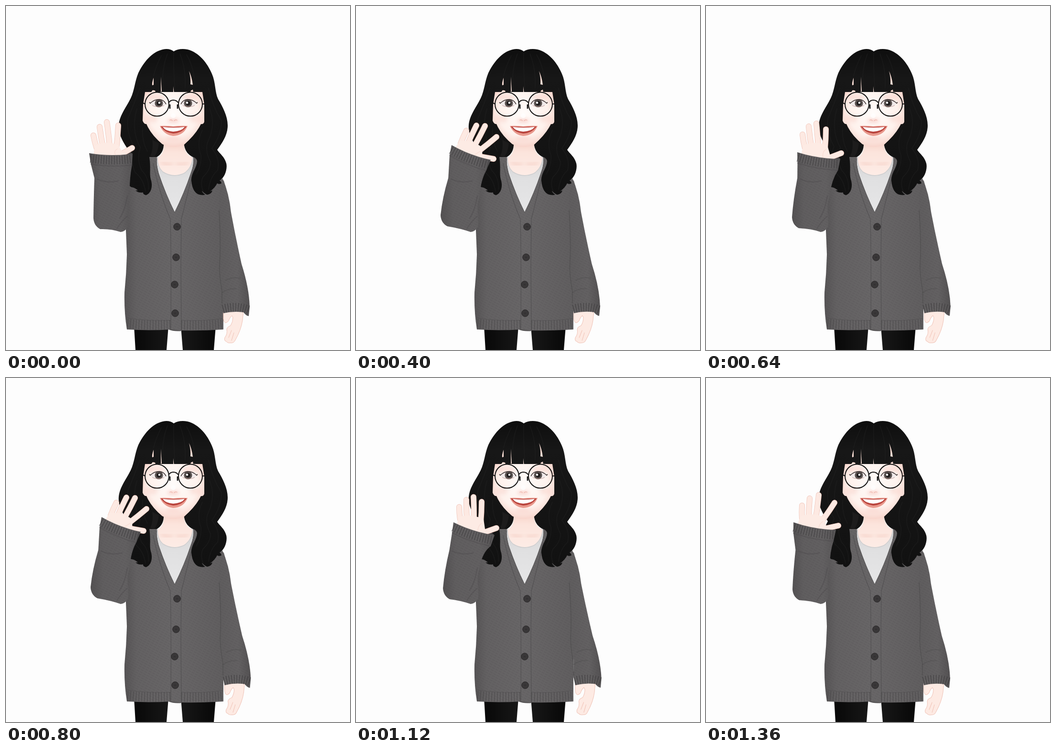
Write an HTML page that moves like this. It is 720 by 720 pixels and loops after 1440 ms.

```html
<!DOCTYPE html>
<html lang="en">
<head>
<meta charset="utf-8">
<title>Waving avatar</title>
<style>
html, body { margin: 0; width: 100%; height: 100%; overflow: hidden; background: #fdfdfd; }
svg { display: block; width: 100vw; height: 100vh; }
.line { fill: none; stroke-linecap: round; stroke-linejoin: round; }
.soft { filter: url(#blur); }
.knit { fill: url(#knit); }
</style>
</head>
<body>
<svg viewBox="0 0 720 720">
  <defs>
    <filter id="blur" x="-50%" y="-50%" width="200%" height="200%"><feGaussianBlur stdDeviation="4"/></filter>
    <pattern id="knit" width="8" height="5" patternUnits="userSpaceOnUse" patternTransform="rotate(28)">
      <path d="M0 1H6" stroke="#3e3c3d" stroke-opacity=".24" stroke-width="1"/>
    </pattern>
    <linearGradient id="wool" gradientUnits="userSpaceOnUse" x1="248" x2="456" y1="0" y2="0">
      <stop offset="0" stop-color="#565455"/><stop offset=".12" stop-color="#636162"/>
      <stop offset=".5" stop-color="#686667"/><stop offset="1" stop-color="#605e5f"/>
    </linearGradient>
    <linearGradient id="sleeve">
      <stop offset="0" stop-color="#5f5d5e"/><stop offset=".6" stop-color="#636162"/><stop offset="1" stop-color="#535152"/>
    </linearGradient>
    <linearGradient id="fore">
      <stop offset="0" stop-color="#535152"/><stop offset=".25" stop-color="#605e5f"/>
      <stop offset=".7" stop-color="#626061"/><stop offset="1" stop-color="#575556"/>
    </linearGradient>
    <linearGradient id="leg">
      <stop offset="0" stop-color="#080808"/><stop offset=".5" stop-color="#1a1a1a"/><stop offset="1" stop-color="#080808"/>
    </linearGradient>
    <radialGradient id="skin" gradientUnits="userSpaceOnUse" cx="350" cy="222" r="78">
      <stop offset="0" stop-color="#fffcfa"/><stop offset=".65" stop-color="#fef2ed"/><stop offset="1" stop-color="#f7cfc5"/>
    </radialGradient>
    <linearGradient id="neck" x2="0" y2="1">
      <stop offset="0" stop-color="#f6cfc4"/><stop offset=".35" stop-color="#fce4dc"/><stop offset="1" stop-color="#fdece6"/>
    </linearGradient>
    <linearGradient id="shirt" x2="0" y2="1">
      <stop offset="0" stop-color="#d2d2d3"/><stop offset=".4" stop-color="#e0e0e1"/><stop offset="1" stop-color="#e6e6e7"/>
    </linearGradient>
    <linearGradient id="hair" gradientUnits="userSpaceOnUse" x1="0" x2="0" y1="90" y2="396">
      <stop offset="0" stop-color="#0e0e0e"/><stop offset=".2" stop-color="#171717"/><stop offset="1" stop-color="#111"/>
    </linearGradient>
  </defs>

  <rect width="720" height="720" fill="#fdfdfd"/>
  <path d="M268 670H340L336 720H271Z M366 670H439L435 720H370Z" fill="url(#leg)"/>

  <!-- cardigan -->
  <path d="M340 670H368V680Q352 682 340 677Z" fill="#555354"/>
  <g id="body"></g>
  <path class="line" d="M254 653Q300 660 345 658M367 658Q415 660 453 654" stroke="#4b494a" stroke-opacity=".5"/>
  <path d="M254 665Q300 669 345 667M367 668Q412 669 453 666" fill="none" stroke="#3f3d3e" stroke-opacity=".5" stroke-width="20" stroke-dasharray="1.3 4.6"/>
  <path class="line" d="M308 330Q322 395 344 446Q346 520 345 677M392 345Q376 410 367 446L366 540L367 679" stroke="#434142" stroke-opacity=".5" stroke-width="1.2"/>
  <g id="buttons" fill="#393738" stroke="#292728"></g>

  <g id="side">
    <path d="M455 641V655Q456 663 460 663Q466 661 467 656Q470 650 473 648L475 652Q475 661 470 669Q462 672 462 677Q464 686 458 694Q456 701 461 702Q464 706 470 705Q477 706 480 699Q492 678 495 658L497 638Z" fill="#fdeae3" stroke="#f0c4b8"/>
    <path class="line" d="M472 679L466 694M477 684L472 700" stroke="#f0c2b6"/>
    <g id="right"></g>
    <path class="line" d="M446 428Q450 500 447 540Q446 562 452 596L452 622" stroke="#434142" stroke-opacity=".4" stroke-width="1.5"/>
    <path class="line" d="M452 600Q466 590 482 592M460 574Q475 566 490 570" stroke="#474546" stroke-opacity=".3" stroke-width="2"/>
    <path d="M454 634Q482 626 508 636" fill="none" stroke="#353334" stroke-opacity=".6" stroke-width="18" stroke-dasharray="1.3 4"/>
  </g>

  <path d="M316 316Q314 328 320 350Q334 392 353 432Q372 392 386 352Q394 330 391 315Z" fill="url(#shirt)"/>
  <path class="line" d="M316 318Q313 330 320 354Q335 396 353 432Q374 390 387 350Q395 328 396 318" stroke="#565455"/>
  <path d="M330 280H373V294Q376 311 391 318Q389 339 373 350Q350 361 328 347Q317 337 317 318Q329 310 330 296Z" fill="url(#neck)"/>
  <path class="line" d="M317 319Q317 337 328 347Q350 361 373 350Q389 339 391 318" stroke="#cfcfd0" stroke-width="1.6"/>
  <path class="line soft" d="M326 328Q340 334 347 331M358 331Q368 334 380 328" stroke="#f0bfb2" stroke-width="3"/>

  <!-- hair -->
  <path fill="url(#hair)" d="M351 95Q342 88 328 91C305 96 288 118 277 140C269 160 269 176 261 193C252 212 238 228 236 248C234 268 245 284 255 300C243 320 242 345 256 366Q254 374 262 379Q270 380 276 386L271 386Q278 392 287 390Q286 394 293 396C304 392 307 378 304 366C299 352 304 342 300 316H316Q329 308 330 292V285H372L373 292Q376 309 391 316Q399 318 400 325C399 340 387 350 388 366Q390 388 402 394Q410 397 417 395Q411 391 410 387Q416 393 421 395Q430 394 432 386L427 388Q438 380 442 371Q446 374 451 371Q450 367 447 365C458 360 464 340 461 329C457 315 448 310 442 301C453 286 464 270 464 250C464 230 453 210 444 195C437 180 439 160 431 142C422 120 404 97 380 91Q362 88 351 95Z"/>
  <g class="line" stroke="#262626" stroke-opacity=".4" stroke-width="1.6">
    <path d="M351 97Q350 120 353 170M338 100Q326 130 328 172M364 100Q377 132 375 172M325 104Q312 130 309 146M378 102Q390 122 394 150"/>
    <path d="M280 172Q268 205 255 236Q252 266 268 294Q258 320 270 348Q288 362 292 388M274 215Q261 260 281 296Q273 322 284 344Q300 360 298 384M286 255Q284 284 296 304"/>
    <path d="M424 172Q432 210 451 240Q451 270 431 298Q449 320 443 344Q428 356 424 384M426 214Q440 248 422 285Q416 304 428 326Q428 344 412 358Q406 372 413 389M411 260Q398 286 408 312Q410 332 398 352"/>
  </g>
  <path d="M302 314Q309 298 306 280L320 287Q318 306 311 315Z" fill="#1d1c1c"/>

  <!-- face -->
  <path d="M291 180L287 206L286 240Q289 248 294 247Q303 269 327 289Q350 301 373 290Q398 268 408 247Q414 248 415 242L415 206L411 180Z" fill="url(#skin)"/>
  <g fill="#f6dcd3">
    <path d="M309 150Q305 161 306 166L309 165ZM324 148L324 179H326ZM350 168L350 180H351.5ZM383 136Q387 150 386 164L391 165Q389 148 383 136Z"/>
    <path d="M304 180L307 176L312 177L313 180ZM386 180L387 177L391 175L392 180Z"/>
  </g>
  <g class="soft" fill="#f4aea4">
    <ellipse cx="316" cy="191" rx="18" ry="6" opacity=".3"/>
    <ellipse cx="384" cy="191" rx="18" ry="6" opacity=".3"/>
    <ellipse cx="305" cy="236" rx="13" ry="8" opacity=".25"/>
    <ellipse cx="397" cy="236" rx="13" ry="8" opacity=".25"/>
    <ellipse cx="350" cy="240" rx="13" ry="3" opacity=".7"/>
    <ellipse cx="350" cy="277" rx="17" ry="2.5" opacity=".5"/>
  </g>
  <ellipse cx="350" cy="230" rx="5" ry="5" fill="#fff" opacity=".65"/>
  <path class="line" d="M343 239Q346 237 348 240M352 240Q355 237 358 239" stroke="#e8a095" stroke-opacity=".6" stroke-width="1.5"/>
  <path d="M322 251Q337 250 350 252Q364 250 380 251Q372 271 350 272Q331 270 322 251Z" fill="#e9998d"/>
  <path d="M324 252Q350 254 378 252Q369 266 350 267Q332 265 324 252Z" fill="#b9443d"/>
  <path d="M328 253Q350 256 374 253Q368 262 350 263Q334 262 328 253Z" fill="#fff"/>

  <g id="eyes"></g>
  <g fill="none" stroke="#121212" stroke-width="2">
    <circle cx="316" cy="205.5" r="25"/><circle cx="386" cy="205.5" r="25"/>
    <path d="M340 203Q344 197 350 197Q357 197 361 203M287 203L291 205M411 205H415"/>
    <path d="M343 206V215M359 206V215" stroke-width="2.6"/>
  </g>

  <!-- waving arm -->
  <path id="inner" fill="#474546"/>
  <g id="hand" class="line"></g>
  <path id="palm" fill="#fdebe4"/>
  <path id="crease" class="line" stroke="#f2c6ba" stroke-opacity=".4" stroke-width="1.2"/>
  <path id="arm" fill="url(#fore)"/>
  <path id="armKnit" class="knit"/>
  <path id="folds" class="line" stroke="#434142" stroke-opacity=".3" stroke-width="2"/>
  <path id="rib" fill="none" stroke="#353334" stroke-opacity=".6" stroke-width="18" stroke-dasharray="1.3 4.2"/>
</svg>
<script>
const $ = id => document.getElementById(id);
const STEP = 80, STEPS = 18;

const knitted = (id, d, fill) => {
  $(id).innerHTML = `<path d="${d}" fill="url(#${fill})"/><path class="knit" d="${d}"/>`;
};
knitted('body', 'M300 316L316 314Q314 328 320 350Q334 392 353 432Q372 392 386 352Q394 330 391 315L398 317L456 366Q466 400 468 430L455 540V677Q410 680 367 679L345 677Q298 680 253 677Q247 640 248 600Q252 560 253 520L251 470V440Q244 380 258 350Z', 'wool');
knitted('right', 'M453 360Q467 392 471 432Q481 486 493 540Q509 590 510 630L508 649Q502 648 497 641Q476 638 455 643L451 622Q455 585 447 545Q449 490 446 400Z', 'sleeve');

$('buttons').innerHTML = [[358, 462], [356, 526], [353, 583], [354, 643]].map(([x, y]) =>
  `<circle cx="${x}" cy="${y}" r="7.3"/><path d="M${x - 2} ${y}h4"/>`).join('');

const eye = (x, flip, shine) => `<g transform="translate(${x} 203.5) scale(${flip} 1)">
  <path d="M-16 0Q-8 -8 3 -8Q13 -7 17 2Q9 9 -3 8Q-11 7 -16 0Z" fill="#f1eaea"/>
  <circle cx="2" cy="0" r="8.6" fill="#5a5250"/><circle cx="2" cy="0" r="4.8" fill="#1d1a1a"/>
  <path d="M-18 -2L-16 0Q-8 -8 3 -8Q13 -7 17 2" fill="none" stroke="#3a3030" stroke-width="1.7"/>
  <path d="M-12 4.500Q-3 10 13 5" fill="none" stroke="#b88f88" stroke-width=".8"/>
  <circle cx="${shine}" cy="-1" r="2.3" fill="#fff"/></g>`;
$('eyes').innerHTML = eye(318, 1, 3) + eye(383, -1, 4);

// cuff left, cuff right, elbow, pinky base, index base, tips: pinky, ring, middle, index, thumb
const POSES = [
  [174,308, 265,309, 183,444, 190,298, 231,298, 183,271, 196,253, 211,243, 235,250, 264,297],
  [166,318, 260,301, 186,452, 181,299, 220,293, 166,281, 175,259, 191,245, 213,246, 249,286],
  [191,306, 281,320, 180,442, 207,297, 249,299, 202,269, 215,252, 231,246, 251,258, 283,308],
  [204,302, 290,329, 182,440, 218,296, 261,303, 216,270, 231,255, 246,249, 263,259, 294,314],
  [200,291, 282,322, 177,438, 219,288, 258,303, 231,261, 252,250, 270,251, 294,274, 288,320],
  [183,302, 272,318, 181,442, 201,295, 243,299, 201,267, 217,252, 236,245, 269,261, 277,309]
];
// place in the pose cycle at each step
const CYCLE = [0, .4, 2, 3, 3.5, 4, 5, .3, 2, 3, 4, 5.6, 1, 2, 3, 3.6, 4, 5];
const DRIFT = [[0, 0], [3, .4], [5, 1], [8, 2], [12, 3], [14, 4], [17, 1]];

const mix = (a, b, k) => a + (b - a) * k;
const mid = (p, q, k) => [mix(p[0], q[0], k), mix(p[1], q[1], k)];
const add = (p, x, y) => [p[0] + x, p[1] + y];
const pt = p => p.map(v => v.toFixed(1)).join(' ');

function pose(phase) {
  const i = Math.floor(phase), a = POSES[i % 6], b = POSES[(i + 1) % 6];
  const v = a.map((n, j) => mix(n, b[j], phase - i));
  return Array.from({ length: 10 }, (_, j) => [v[2 * j], v[2 * j + 1]]);
}

const fingers = Array.from({ length: 5 }, () => ['#efc0b4', '#fde9e2'].map((color, i) => {
  const p = document.createElementNS('http://www.w3.org/2000/svg', 'path');
  p.setAttribute('stroke', color);
  p.setAttribute('stroke-width', i ? 10.6 : 12);
  $('hand').append(p);
  return p;
}));

function drawArm(phase) {
  const [cl, cr, el, pb, ib, ...tips] = pose(phase);
  const len = Math.hypot(cr[0] - cl[0], cr[1] - cl[1]);
  const nx = -(cr[1] - cl[1]) / len, ny = (cr[0] - cl[0]) / len;
  const down = (p, d, x = 0) => add(p, nx * d + x, ny * d);
  const set = (id, d) => $(id).setAttribute('d', d);

  tips.forEach((tip, i) => {
    const base = i < 4 ? mid(pb, ib, i / 3) : down(mid(cl, cr, .75), 1);
    const bend = i < 4 ? add(mid(base, tip, .5), i < 2 ? -1 : 1, 0) : mid(base, tip, .5);
    fingers[i].forEach(f => f.setAttribute('d', `M${pt(base)}Q${pt(bend)} ${pt(tip)}`));
  });
  const wl = down(mid(cl, cr, .09), 8), wr = down(mid(cl, cr, .8), 8);
  set('palm', `M${pt(wl)}L${pt(down(pb, -6, -4))}Q${pt(down(mid(pb, ib, .5), -17))} ${pt(down(ib, -7, 4))}L${pt(mid(cl, cr, .78))}L${pt(wr)}Z`);
  set('crease', `M${pt(add(ib, 2, 1))}Q${pt(add(ib, -6, 6))} ${pt(down(mid(cl, cr, .6), 2))}`);
  set('inner', `M${pt(mid(cl, cr, .62))}Q${pt(down(mid(cl, cr, .75), -11))} ${pt(down(cr, -3, -4))}L${pt(cr)}L${pt(down(mid(cl, cr, .7), 8))}Z`);

  const lb = down(cl, 23, 4), rb = down(cr, 24, -1);
  const waist = [mix(lb[0], 191, .55), 360];
  const arm = `M${pt(cl)}Q${pt(down(mid(cl, cr, .5), 7))} ${pt(cr)}L${pt(rb)}Q${pt([mix(rb[0], 254, .6), 364])} 259 395`
    + `Q252 420 256 440L256 462Q248 473 240 473Q220 466 ${pt(add(el, 14, 23))}Q${pt(add(el, 1, 16))} ${pt(el)}`
    + `Q${pt([mix(waist[0], el[0], .75), el[1] - 38])} ${pt(waist)}L${pt(lb)}Z`;
  set('arm', arm);
  set('armKnit', arm);
  set('folds', `M${pt(lb)}Q${pt(down(mid(lb, rb, .5), 6))} ${pt(rb)}M${pt(add(waist, 6, 2))}q20 10 44 4M254 398Q248 430 238 444M254 440Q240 452 232 466`);
  set('rib', `M${pt(down(cl, 11, 3))}Q${pt(down(mid(cl, cr, .5), 17))} ${pt(down(cr, 11, -1))}`);
}

function drift(step) {
  const i = DRIFT.findLastIndex(k => k[0] <= step);
  const [s, a] = DRIFT[i], [e, b] = DRIFT[i + 1] || [STEPS, 0];
  return mix(a, b, (step - s) / (e - s));
}

let last = -1;
const start = performance.now();
function frame(now) {
  const step = Math.floor(Math.max(0, now - start) / STEP) % STEPS;
  if (step !== last) {
    last = step;
    drawArm(CYCLE[step]);
    $('side').setAttribute('transform', `rotate(${-drift(step) * .23} 458 400)`);
  }
  requestAnimationFrame(frame);
}
frame(start);
</script>
</body>
</html>
```
